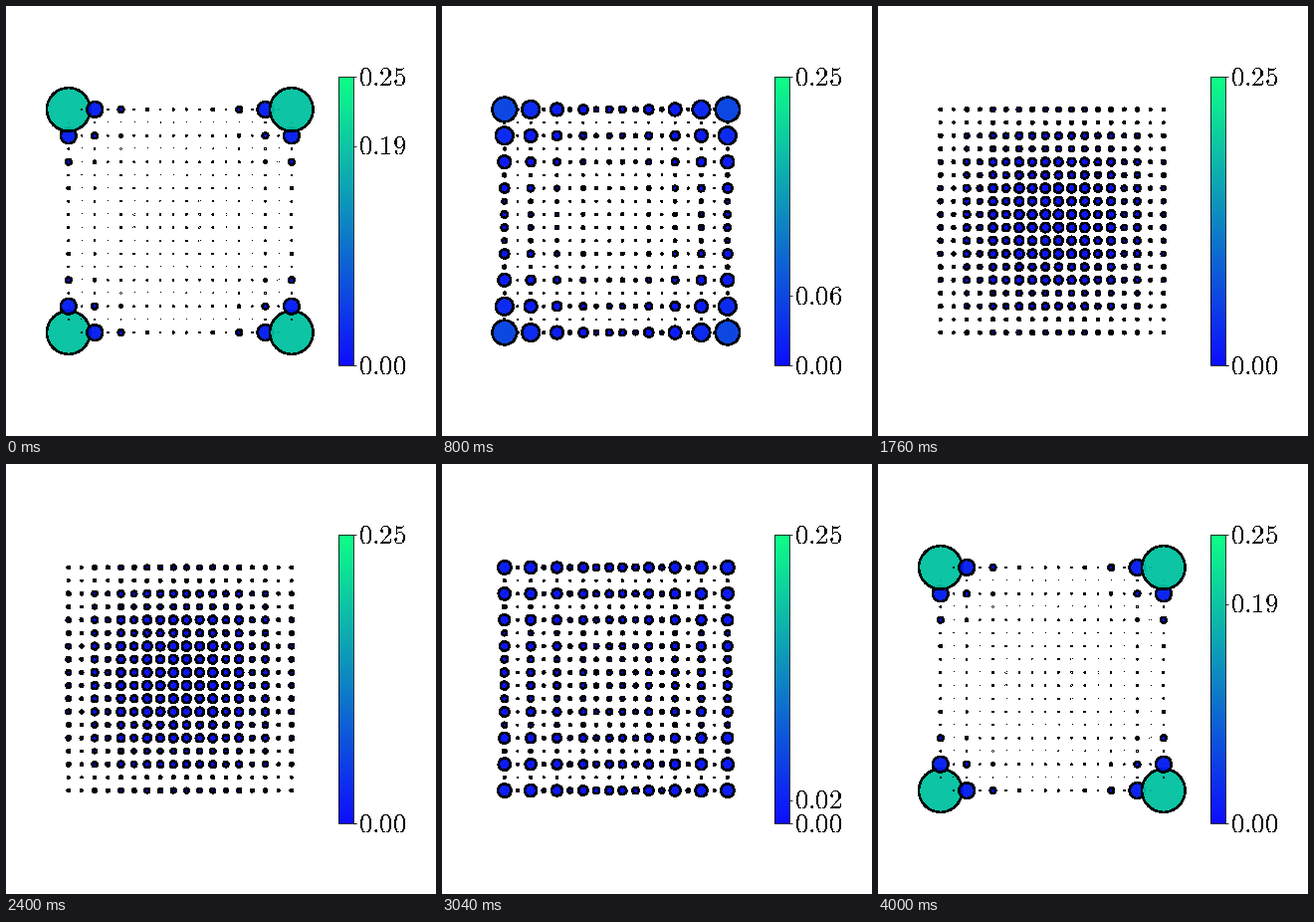
These frames come from a looping animation (432 px wide and 432 px high, 4080 ms). A matplotlib script:

```python
import numpy as np
import matplotlib.pyplot as plt
from matplotlib.animation import FuncAnimation

plt.rcParams["mathtext.fontset"] = "cm"
plt.rcParams["text.antialiased"] = False

SIZE = 432          # stage in pixels
SITES = 18          # sites along each side
STEPS = 50          # steps in one full cycle
P_MAX = 0.25


def edge_density(ratio):
    """Mid-gap density of a dimer chain with hopping ratio intra/inter."""
    hops = np.where(np.arange(SITES - 1) % 2 == 0, ratio, 1.0)
    chain = np.diag(hops, 1) + np.diag(hops, -1)
    _, vecs = np.linalg.eigh(chain)
    mid = vecs[:, SITES // 2 - 1:SITES // 2 + 1]
    return (mid ** 2).mean(axis=1)


def density(step):
    ratio = np.exp(-np.cos(2 * np.pi * step / STEPS) - 0.02)
    line = edge_density(ratio)
    return np.outer(line, line).ravel()


def add_axes(left, top, width, height):
    return fig.add_axes([left / SIZE, 1 - (top + height) / SIZE,
                         width / SIZE, height / SIZE])


fig = plt.figure(figsize=(6, 6), dpi=72, facecolor="white")

# Lattice: every site keeps at least a one-pixel dot
ax = add_axes(29.8, 71, 290, 290)
gx, gy = np.meshgrid(np.arange(SITES), np.arange(SITES), indexing="ij")
ax.plot(gx.ravel(), gy.ravel(), "k,", zorder=0)
start = density(0)
dots = ax.scatter(gx.ravel(), gy.ravel(), s=1e4 * start, c=start,
                  cmap="winter", vmin=0, vmax=P_MAX, alpha=0.95,
                  edgecolors="black", linewidths=1.5, antialiased=False)
ax.set_xlim(-2.5, SITES + 1.5)
ax.set_ylim(-2.5, SITES + 1.5)
ax.axis("off")

# Colour scale
bar = add_axes(334, 71, 14.5, 290)
scale = fig.colorbar(dots, cax=bar, ticks=[])
scale.outline.set_linewidth(0.8)


def add_mark(value):
    tick, = bar.plot([1, 1 + 3.5 / 14.5], [value] * 2, color="black",
                     lw=0.8, clip_on=False, solid_capstyle="butt")
    label = bar.annotate(f"${value:.2f}$", (1, value), xytext=(5.9, -1),
                         textcoords="offset points", fontsize=27,
                         ha="left", va="center", annotation_clip=False)
    return tick, label


add_mark(0)
add_mark(P_MAX)
peak_tick, peak_label = add_mark(0.19)
bar.set_xlim(0, 1)
bar.set_ylim(0, P_MAX)


def update(step):
    p = density(step)
    dots.set_sizes(1e4 * p)
    dots.set_array(p)
    corner = round(float(p[0]), 2)
    peak_tick.set_ydata([corner, corner])
    peak_label.xy = (1, corner)
    peak_label.set_text(f"${corner:.2f}$")
    return dots, peak_tick, peak_label


anim = FuncAnimation(fig, update, frames=STEPS + 1, interval=80,
                     repeat=True, repeat_delay=0, blit=False)
plt.show()
```
